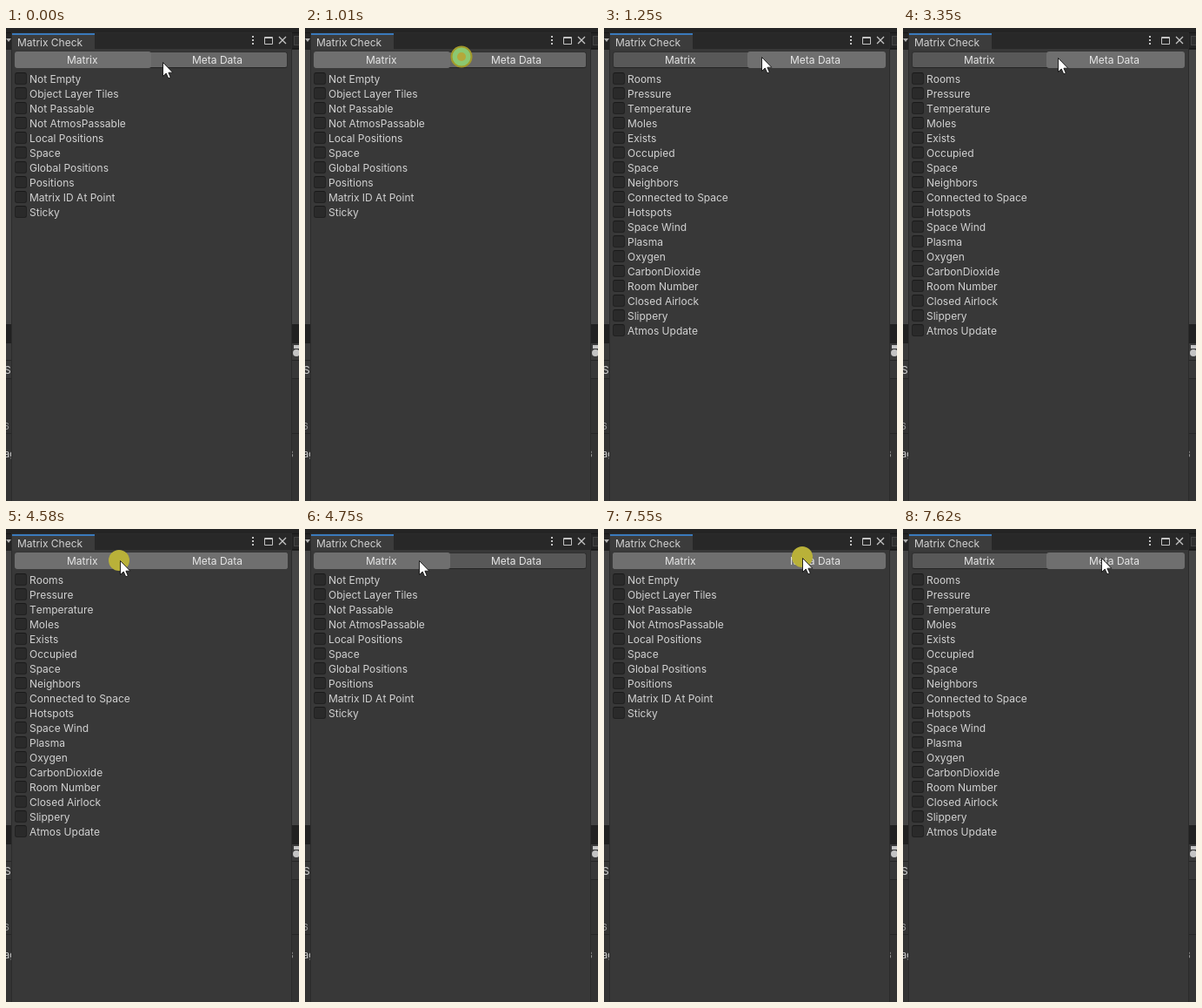
Write an HTML page that moves like this. It is 337 px wide and 543 px high and loops after 9.26 s.

```html
<!DOCTYPE html>
<html lang="en">
<head>
<meta charset="utf-8">
<title>Matrix Check</title>
<style>
html, body { margin: 0; width: 100%; height: 100%; overflow: hidden; background: #383838; }
body { position: relative; font: 12px/17px Inter, sans-serif; font-kerning: none; color: #d2d2d2; }
svg, .page, .tab, .text { position: absolute; }
svg, .page { left: 0; top: 0; width: 337px; height: 543px; }
.text { white-space: nowrap; }
.label { color: #e6e6e6; top: 28px; }

.behind { left: 0; top: 0; width: 6px; height: 543px; overflow: hidden; }
.small { font-size: 11px; }
.dim { color: #999; }

.tab { top: 27px; height: 19px; box-sizing: border-box; border-radius: 3px; }
.off { background: #585858; border: 1px solid #303030; border-bottom-color: #242424; }
.on { background: #6f6f6f; }

.rows { position: absolute; left: 10px; top: 50px; }
.row { height: 17px; padding-left: 17px; position: relative; white-space: nowrap; }
.row::before {
  content: ""; position: absolute; left: 0; top: 1px; width: 12px; height: 12px;
  background: #2a2a2a; border: 1px solid #212121; border-top-color: #191919; border-radius: 3px;
}

.anim { animation: 9260ms step-end infinite; }
#cursor { animation-name: move; }
#matrix { animation-name: matrix; }
#meta { animation-name: meta; }
#metaOff { animation-name: hover; }
#pressed { animation-name: press; }
#spot { animation-name: spot; }
#ring { animation-name: ring; }

@keyframes move {
  0% { transform: translate(180px, 39px); opacity: 1; }
  .863% { transform: translate(180px, 33px); opacity: 1; }
  10.907% { transform: translate(180px, 33px); opacity: 0; }
  11.771% { transform: translate(181px, 33px); opacity: 1; }
  36.177% { transform: translate(178px, 34px); }
  36.933% { transform: translate(165px, 35px); }
  37.796% { transform: translate(145px, 36px); }
  38.552% { transform: translate(131px, 36px); }
  72.246% { transform: translate(137px, 37px); }
  73.11% { transform: translate(168px, 36px); }
  73.974% { transform: translate(208px, 34px); }
  74.73%, 100% { transform: translate(228px, 33px); opacity: 1; }
}
@keyframes matrix {
  0%, 51.295% { opacity: 1; }
  13.498%, 82.289%, 100% { opacity: 0; }
}
@keyframes meta {
  0%, 51.295% { opacity: 0; }
  13.498%, 82.289%, 100% { opacity: 1; }
}
@keyframes hover {
  0%, 73.11%, 100% { background: #676767; }
  13.498% { background: #585858; }
}
@keyframes press {
  0%, 13.498%, 51.295%, 82.289%, 100% { opacity: 0; }
  11.771%, 49.46%, 81.533% { opacity: 1; }
}
@keyframes spot {
  0%, 13.498%, 51.295%, 82.289%, 100% { transform: translate(180px, 33px); opacity: 0; }
  10.907% { transform: translate(180px, 33px); opacity: 1; }
  49.46% { transform: translate(130px, 36px); opacity: 1; }
  81.533% { transform: translate(228px, 32px); opacity: 1; }
}
@keyframes ring {
  0%, 11.771%, 100% { opacity: 0; }
  10.907% { opacity: 1; }
}
</style>
</head>
<body>
<svg viewBox="0 0 337 543">
  <!-- editor behind the window -->
  <rect width="337" height="543" fill="#333"/>
  <rect width="337" height="25" fill="#242424"/>
  <path d="M0 5.5H6M329 5.5H337M329 23.5H337" stroke="#181818"/>
  <path d="M0 12H6L3 16Z" fill="#b0b0b0"/>
  <rect x="331.5" y="9.5" width="7" height="10" fill="#303030" stroke="#444"/>
  <rect y="25" width="337" height="315" fill="#454545"/>
  <rect y="340" width="337" height="22" fill="#212121"/>
  <rect y="362" width="337" height="19" fill="#3a3a3a"/>
  <rect y="381" width="337" height="22" fill="#383838"/>
  <path d="M0 381.5H337M0 402.5H337M0 465.5H337" stroke="#262626"/>
  <path d="M331 364h6v4h-6Z" fill="#c4c4c4"/>
  <circle cx="334" cy="373" r="4" fill="#c4c4c4"/>

  <!-- window frame -->
  <rect x="6" y="5" width="323" height="538" fill="#2b2b2b"/>
  <rect x="7" y="6" width="321" height="537" fill="#383838"/>
  <rect x="7" y="6" width="321" height="18" fill="#282828"/>
  <rect x="7" y="6" width="95" height="19" fill="#3c3c3c"/>
  <rect x="7" y="6" width="95" height="2" fill="#3a79bb"/>
  <path d="M283 9h2v2h-2ZM283 13h2v2h-2ZM283 17h2v2h-2Z" fill="#c4c4c4"/>
  <path d="M297.5 10.5H306.5V18.5H297.5ZM297 11.5H307" fill="none" stroke="#c4c4c4"/>
  <path d="M314 10L322 18M322 10L314 18" stroke="#c4c4c4" stroke-width="1.3"/>
</svg>

<div class="text behind">
  <div class="text" style="left:-2px;top:384px">S</div>
  <div class="text small dim" style="left:-3px;top:449px">6</div>
  <div class="text small" style="left:-2px;top:481px">ag</div>
</div>
<div class="text small dim" style="left:324px;top:481px;clip-path:inset(0 0 0 5px)">3</div>
<div class="text" style="left:13px;top:8px">Matrix Check</div>

<div id="matrix" class="page anim">
  <div id="metaOff" class="tab off anim" style="left:160px;width:164px"></div>
  <div class="tab on" style="left:10px;width:157px"></div>
</div>
<div id="meta" class="page anim">
  <div class="tab off" style="left:10px;width:160px"></div>
  <div class="tab on" style="left:165px;width:159px"></div>
</div>
<div id="pressed" class="tab on anim" style="left:10px;width:314px"></div>
<div class="text label" style="left:70px">Matrix</div>
<div class="text label" style="left:214px">Meta Data</div>

<svg viewBox="0 0 337 543">
  <g id="spot" class="anim">
    <circle r="12" fill="#b9b139"/>
    <g id="ring" class="anim">
      <circle r="11.5" fill="#8cc870" stroke="#a2992a" stroke-width="2"/>
      <circle r="5" fill="#b5a83a"/>
    </g>
  </g>
  <path id="cursor" class="anim" d="M.5 .5V16.5L4.2 13L6.8 18.8L9.3 17.7L6.9 12.2H11.8Z" fill="#fff" stroke="#111" stroke-width=".9"/>
</svg>

<script>
const lists = {
  matrix: ["Not Empty", "Object Layer Tiles", "Not Passable", "Not AtmosPassable",
    "Local Positions", "Space", "Global Positions", "Positions", "Matrix ID At Point", "Sticky"],
  meta: ["Rooms", "Pressure", "Temperature", "Moles", "Exists", "Occupied", "Space",
    "Neighbors", "Connected to Space", "Hotspots", "Space Wind", "Plasma", "Oxygen",
    "CarbonDioxide", "Room Number", "Closed Airlock", "Slippery", "Atmos Update"]
};
for (const [id, labels] of Object.entries(lists)) {
  const rows = document.createElement("div");
  rows.className = "rows";
  rows.innerHTML = labels.map(label => `<div class="row">${label}</div>`).join("");
  document.getElementById(id).append(rows);
}
</script>
</body>
</html>
```
